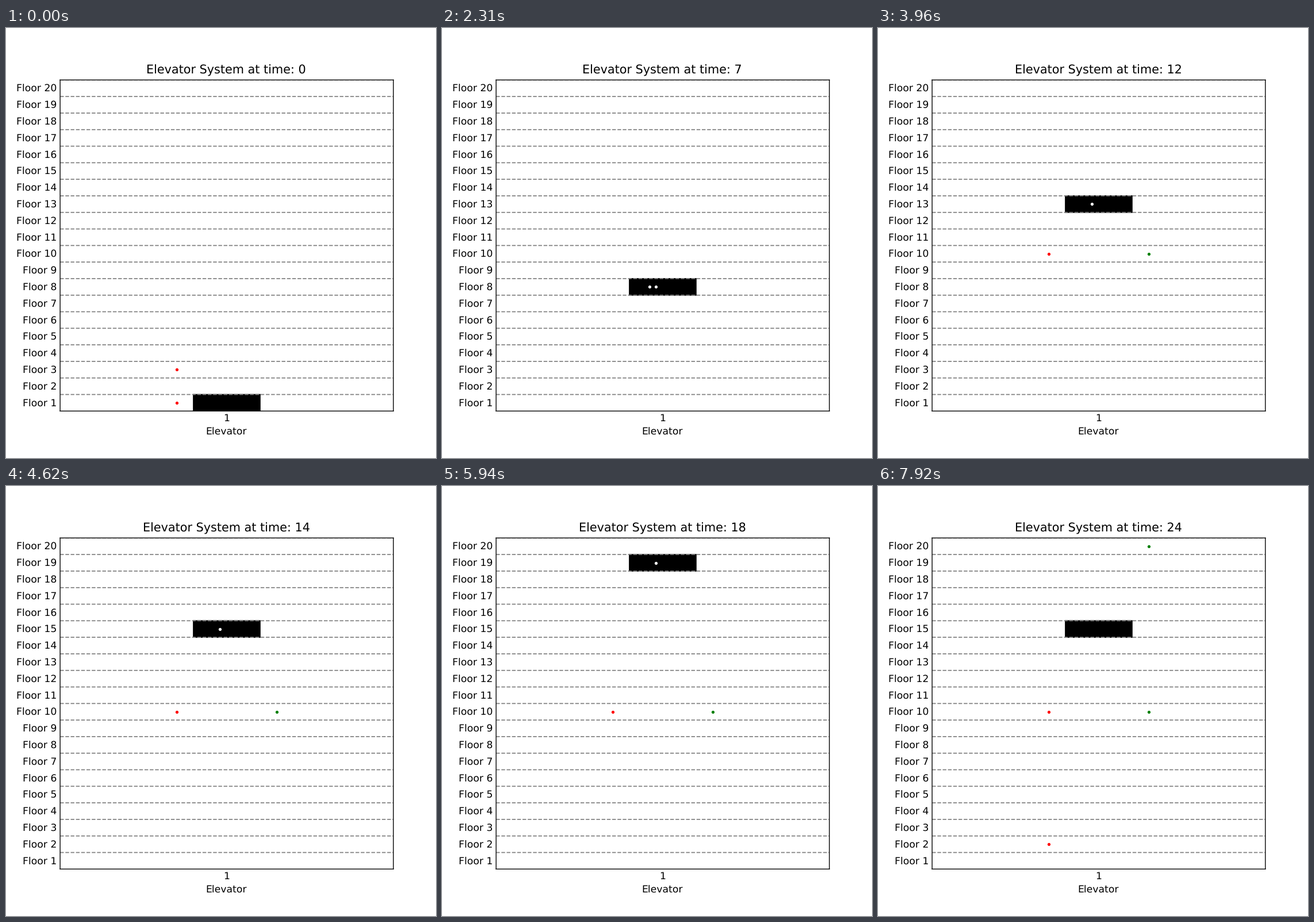
Write a matplotlib script that moves like this. It is 748 by 748 pixels and loops after 8 s.

```python
import matplotlib.pyplot as plt
from matplotlib.animation import FuncAnimation
from matplotlib.patches import Rectangle

SIZE, INCHES = 748, 6
GRID = 600                             # layout units across the stage
FLOORS = 20
LOOP, INTERVAL, STEP = 8000, 40, 330   # milliseconds
LABEL_X = 0.4985                       # text centre, as a share of the axes

plt.rcParams.update({
    "font.family": "DejaVu Sans",
    "text.hinting": "none",
    "path.snap": False,
})

fig = plt.figure(figsize=(INCHES, INCHES), dpi=SIZE / INCHES,
                 facecolor="white")
ax = fig.add_axes([75.5 / GRID, 65.5 / GRID, 465 / GRID, 462 / GRID])
ax.set_xlim(0.5, 1.5)
ax.set_ylim(0, FLOORS)
ax.set_xticks([0.5 + LABEL_X], ["1"])
ax.set_yticks([k + 0.5 for k in range(FLOORS)],
              [f"Floor {k + 1}" for k in range(FLOORS)])
ax.tick_params(length=0)
ax.tick_params(axis="x", pad=2.7)
ax.set_xlabel("Elevator", x=LABEL_X)
title = ax.set_title("", x=LABEL_X)

for k in range(1, FLOORS + 1):
    ax.axhline(k, color="gray", linestyle="--", linewidth=1)

car = ax.add_patch(Rectangle((0.9, 0), 0.2, 1, color="black", linewidth=1))


def dots(color):
    return ax.plot([], [], "o", color=color, markersize=2, zorder=3)[0]


waiting, arrived, riding = dots("red"), dots("green"), dots("white")

# (floor, first step shown, first step gone)
CALLS = [(1, 0, 1), (3, 0, 3), (10, 10, 99), (2, 20, 99)]
EXITS = [(10, 10, 99), (20, 20, 99)]
RIDES = [(1, 10), (3, 20)]             # (boarding step, leaving step)


def place(line, x, spans, step):
    ys = [floor - 0.5 for floor, start, end in spans if start <= step < end]
    line.set_data([x] * len(ys), ys)


def update(i):
    step = (i * INTERVAL + INTERVAL - 10) // STEP
    level = FLOORS - 1 - abs(step - (FLOORS - 1))
    title.set_text(f"Elevator System at time: {step}")
    car.set_y(level)
    place(waiting, 0.85, CALLS, step)
    place(arrived, 1.15, EXITS, step)
    count = sum(start <= step < end for start, end in RIDES)
    riding.set_data([1 - 0.02 * (n + 1) for n in range(count)],
                    [level + 0.5] * count)
    return title, car, waiting, arrived, riding


anim = FuncAnimation(fig, update, frames=LOOP // INTERVAL, interval=INTERVAL,
                     repeat=True, repeat_delay=0, blit=False)
plt.show()
```
